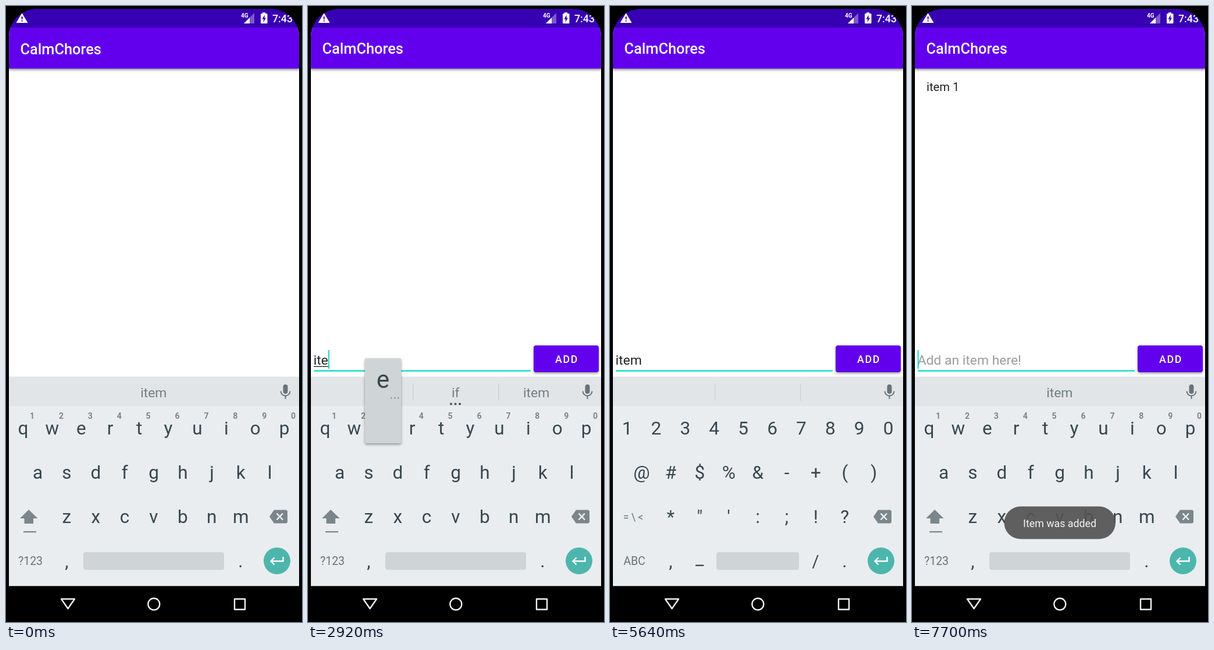
Write an HTML page with a canvas that moves like this. It is 509 px wide and 1058 px high and loops after 8 s.

```html
<!DOCTYPE html>
<html lang="en">
<head>
<meta charset="utf-8">
<title>To-do list demo</title>
<style>
  html, body { margin: 0; width: 100%; height: 100%; overflow: hidden; background: #000; }
  canvas { display: block; width: 509px; height: 1058px; }
</style>
</head>
<body>
<canvas id="stage" width="509" height="1058"></canvas>
<script>
const ctx = document.getElementById('stage').getContext('2d');
const LOOP = 8000, PITCH = 49.9;
const TEAL = '#03dac5', PURPLE = '#6200ee', INK = '#37474f', GRAY = '#737d82', ICON = '#7a868c';

const INITIAL = {
  row: false, cursor: false, text: '', composing: false, symbols: false, item: false,
  words: ['', 'item', ''], dividers: false, more: false, bold: false,
  popup: null, ripple: 0, toast: 0
};
const suggest = (left, mid, right, bold = false) =>
  ({ words: [left, mid, right], dividers: true, more: true, bold });
const key = (label, x, row = 0) => ({ popup: { label, x, row } });

// Each entry changes part of the state from its time on.
const TIMELINE = [
  [60, { row: true }],
  [180, { cursor: true }],
  [660, { cursor: false }],
  [1140, { cursor: true }],
  [1680, key('i', 378)],
  [1740, { text: 'i', composing: true }],
  [1790, suggest('in', 'I', 'is', true)],
  [1850, { popup: null }],
  [2330, key('t', 229)],
  [2390, { text: 'it' }],
  [2450, { popup: null }],
  [2560, suggest('it', 'if', 'item')],
  [2920, { ...key('e', 129), text: 'ite' }],
  [2980, { popup: null }],
  [3030, suggest('ite', 'item', 'its', true)],
  [3570, key('m', 403.5, 2)],
  [3630, { text: 'item' }],
  [3690, { popup: null }],
  [3810, suggest('items', 'item', 'itemized')],
  [4170, { text: 'item ', composing: false }],
  [4280, { words: ['', '', ''], more: false, bold: false }],
  [4700, { cursor: false }],
  [5050, { symbols: true }],
  [5170, { cursor: true }],
  [5640, { cursor: false }],
  [5820, { ...key('1', 40), cursor: true }],
  [5880, { text: 'item 1' }],
  [5940, { popup: null }],
  [6360, { cursor: false }],
  [6710, { ripple: 0.06 }],
  [6770, { ripple: 0.12, item: true, text: '', cursor: true }],
  [6830, { ripple: 0.15, symbols: false, words: ['', 'item', ''], dividers: false }],
  [6880, { ripple: 0.13, toast: 0.3 }],
  [6940, { ripple: 0.1, toast: 0.63 }],
  [7000, { ripple: 0.05, toast: 0.93 }],
  [7050, { ripple: 0, toast: 1 }],
  [7220, { cursor: false }],
  [7700, { cursor: true }]
];

function stateAt(time) {
  return Object.assign({}, INITIAL, ...TIMELINE.filter(([at]) => at <= time).map(e => e[1]));
}

function rect(x, y, w, h, color, radius = 0) {
  ctx.fillStyle = color;
  ctx.beginPath();
  ctx.roundRect(x, y, w, h, radius);
  ctx.fill();
}

function shadowed(blur, dy, draw) {
  ctx.save();
  ctx.shadowColor = 'rgba(0,0,0,.4)';
  ctx.shadowBlur = blur;
  ctx.shadowOffsetY = dy;
  draw();
  ctx.restore();
}

function trace(points, close) {
  ctx.beginPath();
  points.forEach(([x, y]) => ctx.lineTo(x, y));
  if (close) ctx.closePath();
}

function poly(color, ...points) {
  ctx.fillStyle = color;
  trace(points, true);
  ctx.fill();
}

function line(color, width, ...points) {
  ctx.strokeStyle = color;
  ctx.lineWidth = width;
  trace(points);
  ctx.stroke();
}

function disc(x, y, r, color) {
  ctx.fillStyle = color;
  ctx.beginPath();
  ctx.arc(x, y, r, 0, 7);
  ctx.fill();
}

function label(str, x, y, size, color, align = 'left', weight = 400) {
  ctx.font = `${weight} ${size}px Roboto, sans-serif`;
  ctx.fillStyle = color;
  ctx.textAlign = align;
  ctx.fillText(str, x, y);
}

function drawStatusBar() {
  rect(5, 5, 499, 32, '#3700b3');
  poly('#fff', [27.5, 12], [37.5, 29], [17.5, 29]);
  rect(26.6, 18, 2, 5, '#3700b3');
  rect(26.6, 24.5, 2, 2, '#3700b3');
  label('4G', 404, 20, 10, '#fff', 'left', 700);
  poly('rgba(255,255,255,.35)', [409, 30], [427, 12], [427, 30]);
  poly('#fff', [409, 30], [419, 20], [419, 30]);
  rect(441, 11, 5, 3, '#fff');
  rect(438, 13, 11.5, 17, '#fff', 1);
  poly('#3700b3', [444.8, 15], [440.5, 22.5], [443, 22.5], [442.5, 28], [447, 20.5], [444.5, 20.5]);
  label('7:43', 458, 27.5, 17.8, '#fff', 'left', 500);
}

function drawApp(s) {
  rect(5, 37, 499, 600, '#fff');
  shadowed(4, 2, () => rect(5, 37, 499, 70.5, PURPLE));
  drawStatusBar();
  label('CalmChores', 24.5, s.row ? 82 : 83, 25.4, '#fff', 'left', 500);
  if (s.item) label('item 1', 25, 146, 20.2, '#212121');
  if (s.row) drawInput(s);
}

function drawInput(s) {
  rect(10, 625.5, 373, 2.2, TEAL);
  label(s.text || 'Add an item here!', 9.5, 616, 22.9, s.text ? '#212121' : '#9b9b9b');
  const width = s.text ? ctx.measureText(s.text).width : 0;
  if (s.composing) rect(10, 618.5, width, 1.5, '#333');
  if (s.cursor) rect(9.5 + width, 591, 2, 32, TEAL);

  shadowed(4, 2, () => rect(388, 583, 112, 46, PURPLE, 4));
  if (s.ripple) rect(388, 583, 112, 46, `rgba(255,255,255,${s.ripple})`, 4);
  ctx.letterSpacing = '1.6px';
  label('ADD', 425, 612.5, 17.8, '#fff', 'left', 500);
  ctx.letterSpacing = '0px';
}

function drawSuggestions(s) {
  rect(5, 636.5, 499, 52, '#e1e5e8');
  s.words.forEach((word, i) => {
    const strong = i === 1 && s.bold;
    label(word, 115 + i * 138.8, 672, 22.9, strong ? INK : GRAY, 'center', strong ? 700 : 400);
  });
  if (s.dividers) [180, 327].forEach(x => rect(x, 648, 1.3, 30, '#cbd0d3'));
  if (s.more) [246, 253.5, 261].forEach(x => disc(x, 683.5, 2, '#46545b'));

  rect(476.5, 650, 8, 16, '#66747b', 4);
  ctx.strokeStyle = '#66747b';
  ctx.lineWidth = 2;
  ctx.beginPath();
  ctx.arc(480.5, 661.5, 8, 0, Math.PI);
  ctx.stroke();
  rect(479.5, 669, 2, 6, '#66747b');
}

function drawKeys(s) {
  rect(5, 688, 499, 308.5, '#e9edf0');
  rect(5, 687.5, 499, 1, '#eff2f4');
  const rows = s.symbols
    ? ['1234567890', '@#$%&-+()', '*"\':;!?']
    : ['qwertyuiop', 'asdfghjkl', 'zxcvbnm'];
  [29.5, 54.5, 104.3].forEach((left, row) => [...rows[row]].forEach((char, i) =>
    label(char, left + i * PITCH, 736 + row * 76, 31.5, INK, 'center')));

  if (s.symbols) {
    label('= \\ <', 40, 884, 17.5, '#667379', 'center');
    label('ABC', 42, 960, 19.5, '#667379', 'center');
    label('_', 154, 960, 31.5, INK, 'center');
    label('/', 353.5, 964, 29, INK, 'center');
    rect(183, 938, 142, 30.5, '#cfd4d7', 4);
  } else {
    [...'1234567890'].forEach((digit, i) =>
      label(digit, 45 + i * PITCH, 709, 14, '#7a858b', 'center', 700));
    poly(ICON, [39, 865], [54.5, 880], [47, 880], [47, 889], [31.5, 889], [31.5, 880], [24, 880]);
    rect(30, 902, 22, 2.2, ICON);
    label('?123', 42, 960, 19.5, '#667379', 'center');
    rect(133, 938, 242, 30.5, '#cfd4d7', 4);
  }
  label(',', 104.3, 964, 31.5, INK, 'center');
  label('.', 403.5, 964, 31.5, INK, 'center');

  poly(ICON, [453, 877], [461, 865.5], [482, 865.5], [484, 867.5], [484, 886.5], [482, 888.5], [461, 888.5]);
  line('#eef1f3', 2.5, [465.5, 871.5], [476, 882.5]);
  line('#eef1f3', 2.5, [476, 871.5], [465.5, 882.5]);

  disc(466, 953, 23, '#4db6ac');
  line('#fff', 2.4, [476.5, 946], [476.5, 953.5], [456, 953.5]);
  line('#fff', 2.4, [461.5, 947.5], [455.5, 953.5], [461.5, 959.5]);
}

function drawPopup({ label: char, x, row }) {
  const top = 605 + row * 76;
  shadowed(4, 2, () => rect(x - 31, top, 62, 146, '#cfd4d7', 2));
  label(char, x, top + 51, 42, INK, 'center');
  [14, 20, 26].forEach(dx => rect(x + dx - 1, top + 67, 2.5, 2.5, '#939ca1'));
}

function drawToast(alpha) {
  ctx.globalAlpha = alpha;
  rect(158.5, 859.5, 191.5, 56, 'rgba(84,83,84,.92)', 28);
  label('Item was added', 254, 895, 17.8, '#f4f4f4', 'center');
  ctx.globalAlpha = 1;
}

function drawNavBar() {
  rect(0, 996.5, 509, 62, '#000');
  ctx.strokeStyle = '#f2f2f2';
  ctx.lineWidth = 2.4;
  ctx.lineJoin = 'round';
  trace([[95, 1018.5], [118, 1018.5], [106.5, 1035]], true);
  ctx.stroke();
  ctx.beginPath();
  ctx.arc(254.3, 1027.3, 10, 0, 7);
  ctx.stroke();
  ctx.strokeRect(393, 1018.5, 18, 18);
  ctx.lineJoin = 'miter';
}

function draw(s) {
  rect(0, 0, 509, 1058, '#000');
  ctx.save();
  ctx.beginPath();
  ctx.roundRect(5, 5, 499, 1053, [48, 48, 0, 0]);
  ctx.clip();
  drawApp(s);
  drawSuggestions(s);
  drawKeys(s);
  if (s.popup) drawPopup(s.popup);
  if (s.toast) drawToast(s.toast);
  ctx.restore();
  drawNavBar();
}

const start = performance.now();
function tick() {
  draw(stateAt((performance.now() - start) % LOOP));
  requestAnimationFrame(tick);
}
tick();
</script>
</body>
</html>
```
